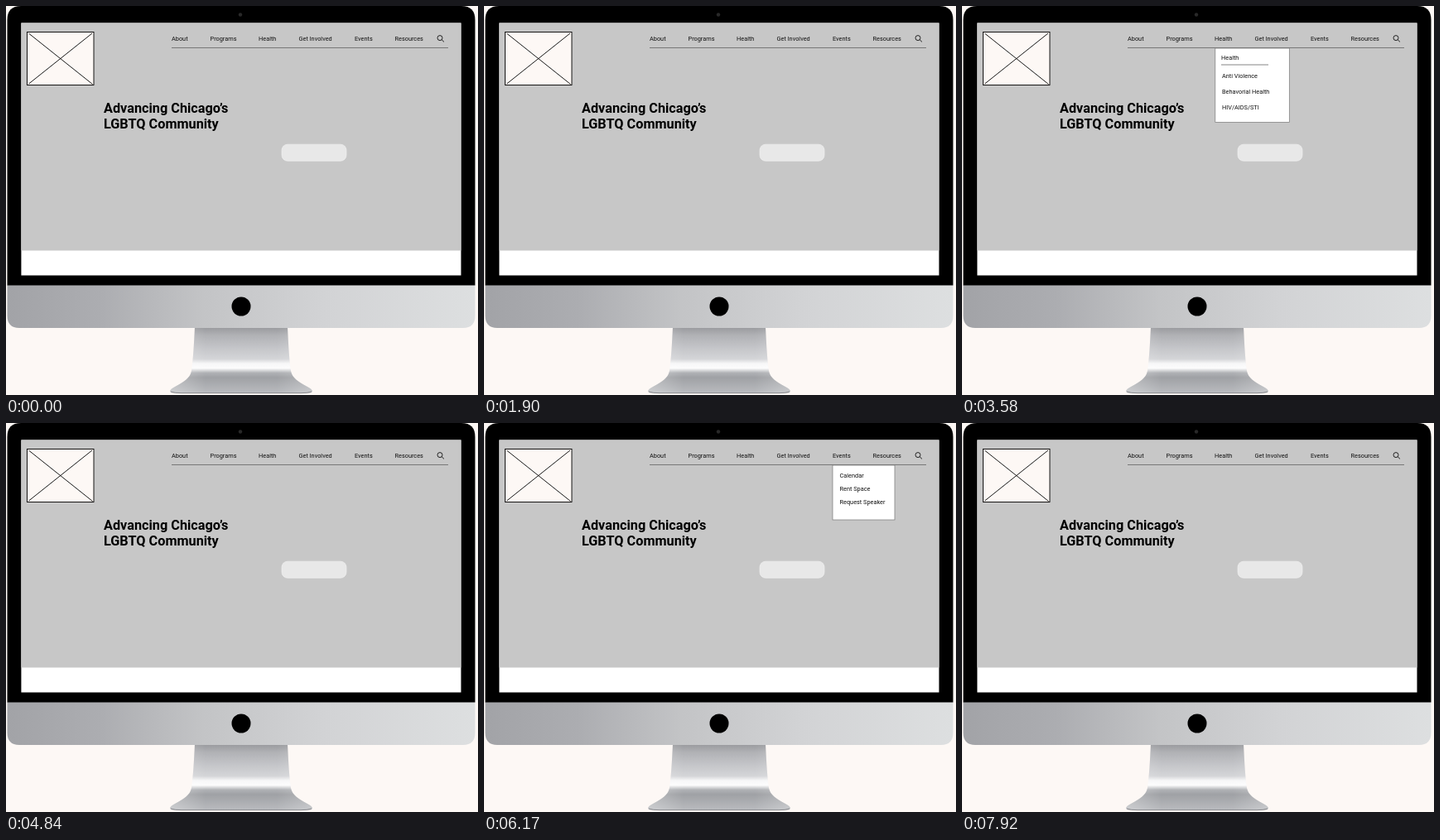
Write an HTML page that moves like this. It is 570x470 px and loops after 8000 ms.

```html
<!DOCTYPE html>
<html lang="en">
<head>
<meta charset="utf-8">
<title>Navigation wireframe</title>
<style>
  html, body { margin: 0; width: 100%; height: 100%; overflow: hidden; background: #fdf8f5; }
  svg { display: block; width: 100%; height: 100%; }
  text { font-family: Roboto, Arial, sans-serif; font-size: 7.35px; fill: #111; }
  .title { font-size: 16.25px; font-weight: 700; fill: #000; }
</style>
</head>
<body>
<svg viewBox="0 0 570 470" xmlns="http://www.w3.org/2000/svg">
  <defs>
    <linearGradient id="chin">
      <stop offset="0" stop-color="#a2a3a7"/>
      <stop offset=".2" stop-color="#acadb1"/>
      <stop offset=".42" stop-color="#c3c4c6"/>
      <stop offset=".68" stop-color="#d2d3d5"/>
      <stop offset="1" stop-color="#dddfe0"/>
    </linearGradient>
    <linearGradient id="neck" x2="0" y2="1">
      <stop offset="0" stop-color="#909195"/>
      <stop offset=".12" stop-color="#a9aaae"/>
      <stop offset=".3" stop-color="#bebfc3"/>
      <stop offset=".48" stop-color="#d0d1d4"/>
      <stop offset=".55" stop-color="#f6f6f7"/>
      <stop offset=".62" stop-color="#fcfcfc"/>
      <stop offset=".69" stop-color="#a9abaf"/>
      <stop offset=".76" stop-color="#97999d"/>
      <stop offset=".9" stop-color="#a8aaae"/>
      <stop offset="1" stop-color="#b4b6ba"/>
    </linearGradient>
    <linearGradient id="shade">
      <stop offset="0" stop-color="#fff" stop-opacity=".35"/>
      <stop offset=".25" stop-color="#fff" stop-opacity=".08"/>
      <stop offset=".75" stop-color="#fff" stop-opacity=".08"/>
      <stop offset="1" stop-color="#fff" stop-opacity=".3"/>
    </linearGradient>
    <path id="stand" d="M228 388H340C341 409 342 427 344 441C346 450 353 454 363 459.5Q370 463 370 465.5Q370 468 360 468H208Q198 468 198 465.5Q198 463 205 459.5C215 454 222 450 224 441C226 427 227 409 228 388Z"/>
  </defs>

  <rect width="570" height="470" fill="#fdf8f5"/>
  <use href="#stand" fill="url(#neck)"/>
  <use href="#stand" fill="url(#shade)"/>
  <path d="M199 466Q204 467.7 212 467.7H356Q364 467.7 369 466" fill="none" stroke="#88898d"/>

  <path d="M1.5 337H566.5V374Q566.5 389 552 389H16Q1.5 389 1.5 374Z" fill="url(#chin)"/>
  <path d="M1.5 337.6V17Q1.5 0 18 0H550Q566.5 0 566.5 17V337.6Z"/>
  <circle cx="283" cy="10.5" r="2.2" fill="#292929"/>
  <circle cx="284" cy="363" r="11.5"/>

  <rect x="18.4" y="20.5" width="531.1" height="305" fill="#fff"/>
  <rect x="18.4" y="20.5" width="531.1" height="275" fill="#c7c7c7"/>
  <rect x="25.5" y="31.5" width="80.5" height="64" fill="#fdf8f5" stroke="#000" stroke-width=".9"/>
  <path d="M28 33.5L104.5 94.5M104 33L27.5 94" stroke="#000" stroke-width=".9"/>

  <text class="title" x="118" y="129">Advancing Chicago’s</text>
  <text class="title" x="118" y="148">LGBTQ Community</text>
  <rect x="333" y="167.2" width="78" height="20" rx="7" fill="#e8e8e8" stroke="#efefef" stroke-width=".7"/>

  <path d="M200 50.5H534" stroke="#777" stroke-width="1"/>
  <g fill="none" stroke="#111" stroke-width=".9">
    <circle cx="524" cy="38.6" r="3"/>
    <path d="M526.2 40.8L529 43.4"/>
  </g>
  <g id="nav"></g>
  <g id="menus"></g>
</svg>
<script>
  const LOOP = 8000;
  const NS = 'http://www.w3.org/2000/svg';

  function add(parent, tag, attrs, text) {
    const node = document.createElementNS(NS, tag);
    for (const key in attrs) node.setAttribute(key, attrs[key]);
    if (text) node.textContent = text;
    return parent.appendChild(node);
  }

  const tabs = { About: 200, Programs: 246.5, Health: 305, 'Get Involved': 353.5, Events: 421, Resources: 469.5 };
  for (const name in tabs) add(nav, 'text', { x: tabs[name], y: 41.7 }, name);

  // on/off give the time a panel is open; rule is the underline's [x1, x2, y].
  const panels = [
    { on: 500, off: 1760, x: 200.5, w: 74.5, h: 65.5, edge: '#ccc',
      textX: 209, first: 65.5, step: 16.2, items: ['History', 'Contact', 'Take a Tour'] },
    { on: 2320, off: 3440, x: 247, w: 90, h: 106, edge: '#777',
      head: ['Social', 256.5], rule: [256, 321.5, 70.5],
      textX: 255.5, first: 86.5, step: 18.6, items: ['Community & Cultural', 'Cyber Center', 'Senior', 'Youth'] },
    { on: 3440, off: 4700, x: 305.8, w: 89.5, h: 89.5, edge: '#777',
      head: ['Health', 313], rule: [313, 370, 71],
      textX: 314, first: 86.5, step: 19, items: ['Anti Violence', 'Behavorial Health', 'HIV/AIDS/STI'] },
    { on: 4980, off: 5820, x: 353.8, w: 75, h: 66, edge: '#777',
      textX: 362.5, first: 66, step: 16.2, items: ['Volunteer', 'Donate', 'Careers'] },
    { on: 5820, off: 7710, x: 421, w: 75, h: 66, edge: '#777',
      textX: 429.5, first: 66, step: 16.2, items: ['Calendar', 'Rent Space', 'Request Speaker'] }
  ];

  for (const p of panels) {
    p.node = add(menus, 'g', { visibility: 'hidden' });
    add(p.node, 'rect', { x: p.x, y: 51, width: p.w, height: p.h, fill: '#fff', stroke: p.edge, 'stroke-width': .7 });
    if (p.head) {
      const [x1, x2, y] = p.rule;
      add(p.node, 'text', { x: p.head[1], y: 64.8 }, p.head[0]);
      add(p.node, 'path', { d: `M${x1} ${y}H${x2}`, stroke: '#777', 'stroke-width': .9 });
    }
    p.items.forEach((item, i) => add(p.node, 'text', { x: p.textX, y: p.first + i * p.step }, item));
  }

  function draw(time) {
    for (const p of panels) {
      p.node.setAttribute('visibility', time >= p.on && time < p.off ? 'visible' : 'hidden');
    }
  }

  const start = performance.now();
  function tick() {
    draw((performance.now() - start) % LOOP);
    requestAnimationFrame(tick);
  }
  tick();
</script>
</body>
</html>
```
